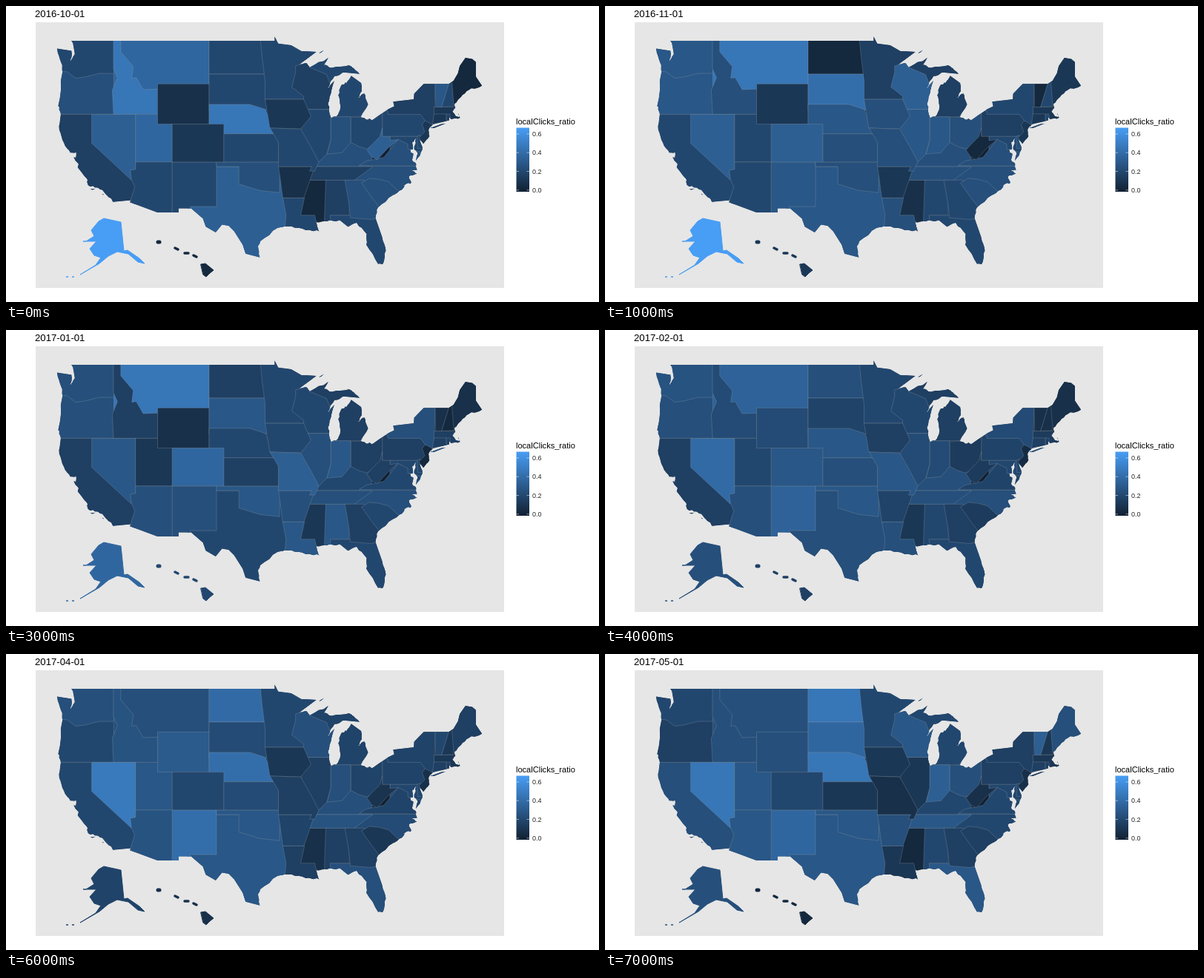
These frames come from a looping animation (800x400 px, 8000 ms). An HTML page:

```html
<!DOCTYPE html>
<html lang="en">
<head>
<meta charset="utf-8">
<title>Monthly ratio map</title>
<style>
html, body { margin: 0; width: 100%; height: 100%; overflow: hidden; background: #fff; }
svg { display: block; width: 800px; height: 400px; font-family: "Liberation Sans", Arial, sans-serif; }
#mainland path { stroke: rgba(150, 162, 170, .42); stroke-width: .7; stroke-linejoin: round; }
</style>
</head>
<body>
<svg viewBox="0 0 800 400">
  <defs>
    <clipPath id="land"><path id="coast"/></clipPath>
    <linearGradient id="ramp" x1="0" y1="1" x2="0" y2="0">
      <stop offset="0" stop-color="#112032"/>
      <stop offset="1" stop-color="#489df4"/>
    </linearGradient>
  </defs>
  <rect x="40" y="22" width="632" height="359" fill="#e6e6e6"/>
  <text id="date" x="39" y="15" font-size="13.2"></text>
  <g id="mainland" clip-path="url(#land)"></g>
  <g id="AK">
    <path d="M132 287L155 292 159 331 164 330 180 341 187 348 178 346 165 335 150 332 138 338 126 348 100 363 121 350 128 340 119 337 113 328 122 318 108 318 119 311 115 303 125 291Z"/>
    <path d="M81 366h3m5 0h3m12-48h4" stroke-width="1.3"/>
  </g>
  <g id="HI" stroke-linecap="round">
    <path d="M205 319h2" stroke-width="5"/>
    <path d="M228 327l4 2m9 5h5m7 3l4 2" stroke-width="3.4"/>
    <path d="M263 349l6-1 11 9-5 4-5 5-4-3Z"/>
  </g>
  <text x="688" y="160" font-size="11.05">localClicks_ratio</text>
  <rect x="688.5" y="164.5" width="17.5" height="86.5" fill="url(#ramp)"/>
  <g id="ticks" font-size="9" fill="#222"></g>
</svg>
<script>
const $ = id => document.getElementById(id);
function add(parent, tag, attrs, text = '') {
  const el = document.createElementNS('http://www.w3.org/2000/svg', tag);
  for (const k in attrs) el.setAttribute(k, attrs[k]);
  el.textContent = text;
  return parent.appendChild(el);
}

// Points are degrees west and north, drawn in Mercator projection.
const merc = lat => Math.log(Math.tan(Math.PI / 4 + lat * Math.PI / 360));
const project = ([w, n]) =>
  [274 + (104.05 - w) * 9.93, 47 + (merc(49) - merc(n)) * 569].map(v => v.toFixed(1)).join(' ');
const points = text => text.match(/\S+ \S+/g).map(p => p.split(' ').map(Number));
const close = pts => 'M' + pts.map(project).join('L') + 'Z';

let seed = 7;
const jitter = () => (seed = seed * 16807 % 2147483647) / 2147483647 - .5;
// Breaks each edge in four with small random bends.
function roughen(pts) {
  const out = [pts[0]];
  for (let i = 1; i < pts.length; i++) {
    const [a, b] = [pts[i - 1], pts[i]];
    const size = Math.min(.2, Math.hypot(b[0] - a[0], b[1] - a[1]) * .2);
    for (const t of [.25, .5, .75])
      out.push(a.map((v, k) => v + (b[k] - v) * t + jitter() * size));
    out.push(b);
  }
  return out;
}

const ring = [];
const border = text => ring.push(...points(text));
const shore = text => ring.push(...roughen(points(text)));

shore('117.12 32.53 118.4 33.75 119.2 34.15 120.5 34.45 120.65 35.15 121.9 36.4 121.8 36.8 122.5 37.5 122.1 37.5 122.1 38.05 122.9 38 123.75 39 124.4 40.4 124.2 42 124.55 42.85 123.95 46.2 124.1 46.9 124.7 48.3');
shore('122.75 48.1 122.9 47.1 122.3 47.8 122.76 49');
border('95.15 49 95.15 49.38 94.65 48.75 92.9 48.6 91.5 48.07 89.5 48');
shore('92.05 46.7 90.8 46.95 90.4 46.57 87.85 47.47 88.45 46.8 87.4 46.52 85 46.77 84.4 46.5 83.6 45.95');
shore('85.5 46.08 87 45.75 88 44.55 87.05 45.28 87.7 43.7 87.9 43 87.5 41.7 86.8 41.77 86.2 42.8 86.5 43.9 86.05 44.92 85.4 45.1 84.75 45.78');
shore('83.4 45.1 83.3 44.3 83.9 43.65 82.95 44.07 82.45 43 83.45 41.72 82.7 41.47 81.7 41.5 78.9 42.8');
border('79.05 43.27 76.25 43.5 76.2 44.05 74.9 45 71.5 45');
border('70.85 45.3 70.25 46 70 46.7 69.23 47.46 68.3 47.36 67.8 47.07 67.8 45.7');
shore('66.97 44.83 68.8 44.4 69.8 43.75 70.7 43.07 70.6 42.65 71 42.35 70.5 41.78 70 41.78 70.2 42.08 69.95 41.65 71.2 41.5 71.4 41.75 71.45 41.4');
shore('73.65 40.98 74.2 40.5 74.1 39.75 74.95 38.95 75.55 39.6 75.05 38.4 75.97 37.13 75.7 37.95 76.2 38.4 75.95 39.55 76.45 39.1 76.38 38.35');
shore('76.9 38.3 76.3 37.9 76.4 37.1 76 36.9 75.8 36.1 76.5 36.05 75.8 35.75 76.9 35.4 76.6 34.7 77.3 34.55 77.9 33.9 79.1 33.3 81.1 31.9 81.45 30.7');
shore('80.55 28.45 80.03 26.8 80.4 25.2 81.1 25.15 82.7 27.5 82.65 28.8 84 30.1 85.2 29.65');
shore('86.3 30.4 88 30.3 89.5 30.2 89.4 29.8 89.1 29.1 90.1 29.2 91.8 29.5 93.85 29.7 94.75 29.5 97.1 27.9 97.4 27.3 97.15 25.95');
border('99.1 26.4 99.5 27.5 100.65 29.1 101.4 29.77 102.3 29.88 103.15 28.98 104.5 29.65 104.9 30.6');
border('106.5 31.78 108.2 31.78 108.2 31.33 111.07 31.33 114.8 32.5 114.72 32.72');

const isles = [
  '74 40.6 72.5 41 71.9 41.07 73.5 40.58', '89.2 47.87 88.45 48.17 88.8 47.95',
  '120.2 34 119.5 34.05 119.9 33.9', '118.6 33.47 118.35 33.3 118.45 33.45'
].map(points);
const land = [ring, ...isles].map(close).join('');
$('coast').setAttribute('d', land);
add($('mainland'), 'path', { d: land, fill: '#112032' });

// Later states cover earlier ones and the coast trims them; two points make a box.
const shapes = { AK: $('AK'), HI: $('HI') };
function state(id, text) {
  let pts = points(text);
  if (pts.length === 2) {
    const [[w, n], [e, s]] = pts;
    pts = [[w, n], [e, n], [e, s], [w, s]];
  }
  shapes[id] = add($('mainland'), 'path', { d: close(pts) });
}
state('OR', '125 46.5 116 42');
state('CA', '125 42 114 32');
state('WA', '125 50 116 50 116 46 119 46 121 45.65 122.2 45.55 123.3 46.15 125 46.25');
state('MT', '117 50 104.05 44.4');
state('ID', '117.04 50 117.04 46.43 116.5 45.6 117.2 44.4 117.03 42 111.05 42 111.05 44.5 113 44.45 113.95 45.6 114.55 45.55 114.35 46.65 116.05 48 116.05 50');
state('NV', '120 42 114.04 42 114.04 36 114.6 35 120 39');
state('UT', '114.04 42 109.05 37');
state('AZ', '114.04 37 109.05 37 109.05 31 115 31 114.72 32.72 114.15 34.25 114.6 35.1 114.75 36.1 114.04 36.2');
state('WY', '111.05 45 104.05 41');
state('TX', '107 36.5 93 25');
state('NM', '109.05 37 103.04 37 103.04 32 106.6 32 106.6 31 109.05 31');
state('OK', '103.05 37 94.4 37 94.48 33.6 97.2 33.85 100 34.56 100 36.5 103.05 36.5');
state('ND', '104.05 50 96 45.94');
state('SD', '104.05 45.94 96 42.4');
state('NE', '104.05 43 98.5 43 96.4 42.5 95 40 104.05 40');
state('CO', '109.05 41 102.05 37');
state('KS', '102.05 40 94.6 37');
state('MI', '91 49 82 41.74');
state('MN', '97.2 50 89 50 89 47.9 92 46.7 91 43.5 96.45 43.5 96.45 45.3 96.85 47.5');
state('WI', '92.3 46.7 90.4 47.1 90.4 46.57 88.1 45.9 87.6 45.05 86.8 45.5 86.8 42.5 91.2 42.5 91.2 43.8 92.8 44.7 92.3 46.1');
state('KY', '89.6 39.2 81.9 36.5');
state('FL', '88 31 79 24');
state('MS', '92 35 88 29');
state('AL', '88.2 35 85 35 85 31 87.6 31 87.5 30 88.4 30');
state('TN', '90.4 35 84 35 81.7 36.5 90.4 36.5');
state('NC', '84.3 35 81.7 36.55 75 36.55 75 33.5 79 33.5');
state('GA', '85.6 35 83 35 80.5 32.5 81 30.7 82.1 30.5 84.86 30.7 85.05 32.3');
state('SC', '83.35 34.7 82.3 35.2 81 35.1 79.67 34.8 78 33.5 80.9 31.9 82 33.1');
state('ME', '71.2 48 66 43');
state('NY', '80 45.1 73.3 45.1 73.5 41 71 41.18 71 40.4 80 40.4');
state('PA', '80.52 42.5 79.76 42.3 79.76 42 75.35 42 74.7 41.36 74.5 40 75.4 39.72 80.52 39.72');
state('MD', '79.48 39.72 75 38');
state('DE', '75.79 39.72 75.4 39.85 75 38.45 75.7 38.46');
state('NJ', '74.7 41.36 73.8 41 73.8 40 74.9 38.8 75.55 39.6 74.75 40.2 75.1 40.95');
state('VA', '83.67 36.6 75 36.55 75 38 77.05 38.4 77.05 38.9 78.35 39.4 80.3 37.5 82.7 37.1');
state('OH', '84.82 39.1 83.7 38.65 82.6 38.4 80.52 39.5 80.52 42.3 83.3 42 83.45 41.73 84.82 41.7');
state('WV', '82.6 38.3 81.97 37.54 81.2 37.25 79.65 38.58 78.35 39.4 79.48 39.3 79.48 39.72 80.52 39.72 80.52 40.63 80.85 39.7 81.75 39');
state('IN', '87.53 41.75 87.53 39.35 88.05 37.85 86 38 84.82 39.1 84.82 41.75');
state('IL', '91 42.5 87 42.5 87.53 41.7 87.53 39.35 88.05 37.85 89.15 37 91 37 91.6 40');
state('IA', '96.45 43.5 95.8 40.6 91.6 40.5 90.2 41.8 91.2 43.5');
state('LA', '94.04 33 91.1 33 91.6 31 89.7 31 89.5 30.2 88.5 30 88.5 28.5 93.8 29 93.6 31');
state('AR', '94.62 36.5 89.7 36.5 91.17 33 94.04 33 94.43 35.4');
state('MO', '95.77 40.6 91.6 40.5 90.2 38.6 89.15 37 89.7 36 90.4 36 90.1 36.5 94.62 36.5 94.62 39.1');
state('MA', '73.5 42.74 69.5 41.2');
state('CT', '73.5 42.04 71.8 42.04 71.8 41.2 73.7 41');
state('RI', '71.8 42.02 71.3 41.3');
state('VT', '73.35 45.1 71.4 45.1 72.46 42.73 73.27 42.73');
state('NH', '71.08 45.4 70.8 42.8 72.46 42.73 71.5 45');

// Each band is 0.04 wide; states not named lie in band 5.
function levels(bands) {
  const out = {};
  for (const id in shapes) out[id] = 5;
  for (const b in bands) for (const id of bands[b].split(' ')) out[id] = +b;
  return out;
}
const oct = levels({ 1: 'ME MS HI', 2: 'AR WY', 3: 'CO NJ CT MA IA', 4: 'CA AL TN NY RI WI',
  6: 'OR OK IN KY GA SC NC VA', 7: 'VT', 8: 'NV TX WV', 9: 'MT UT', 11: 'ID NE', 16: 'AK' });
const nov = levels({ 1: 'ND VT WV', 2: 'MS', 3: 'WY ME CT MA NJ AR HI', 4: 'MN MI PA',
  6: 'ID IA KS OK SC NC VA MO KY LA TN OH DE', 7: 'WA OR NE IL IN TX NM', 8: 'NV CO WI',
  10: 'SD', 11: 'MT', 16: 'AK' });
const dec = levels({ 0: Object.keys(shapes).join(' ') });
const jan = levels({ 1: 'NH NJ', 2: 'WY ME VT', 3: 'UT MS', 4: 'CA ID ND KS MI GA PA OH CT MA RI WV',
  6: 'WA OR AZ NM AR NC TN IL NY', 7: 'NV SD OK AL IN LA', 8: 'MO', 9: 'AK CO', 11: 'MT' });
const mar = levels({ 2: 'SD SC ME VT NJ', 3: 'AK HI AR MS AL IA OH WV MA NH', 4: 'CA GA MI IN VA CT RI',
  6: 'OR AZ MT MO TN NC', 7: 'WA ID UT TX OK KY', 8: 'ND KS', 9: 'WY NE', 11: 'NM', 12: 'NV' });
const may = levels({ 1: 'MS HI', 2: 'MO NJ WV', 3: 'KS IA IL LA NH MA', 4: 'OR SC GA NY PA CT RI',
  6: 'CA MT WY ID OH AK AR ME', 7: 'AZ UT TX OK WI FL TN', 8: 'IN VT', 9: 'SD NM', 11: 'ND NE NV' });
function between(a, b) {
  const out = {};
  for (const id in a) out[id] = (a[id] + b[id]) / 2;
  return out;
}
const months = [
  ['2016-10-01', oct], ['2016-11-01', nov], ['2016-12-01', dec], ['2017-01-01', jan],
  ['2017-02-01', between(jan, mar)], ['2017-03-01', mar], ['2017-04-01', between(mar, may)], ['2017-05-01', may]
];
const low = [17, 32, 50], high = [72, 157, 244];
const shade = level => `rgb(${low.map((c, i) => Math.round(c + (high[i] - c) * level / 16))})`;

for (let i = 0; i < 4; i++) {
  const y = 248.8 - i * 25.3;
  add($('ticks'), 'path', { d: `M688.5 ${y}h3.5m10.5 0h3.5`, stroke: '#fff', 'stroke-width': .5 });
  add($('ticks'), 'text', { x: 710, y: y + 3.2 }, (i / 5).toFixed(1));
}

const start = performance.now();
let shown = -1;
function tick() {
  const m = Math.floor((performance.now() - start) / 1000) % months.length;
  if (m !== shown) {
    shown = m;
    const [date, level] = months[m];
    $('date').textContent = date;
    for (const id in shapes) {
      const color = shade(level[id]);
      shapes[id].setAttribute('fill', color);
      if (id === 'AK' || id === 'HI') shapes[id].setAttribute('stroke', color);
    }
  }
  requestAnimationFrame(tick);
}
tick();
</script>
</body>
</html>
```
